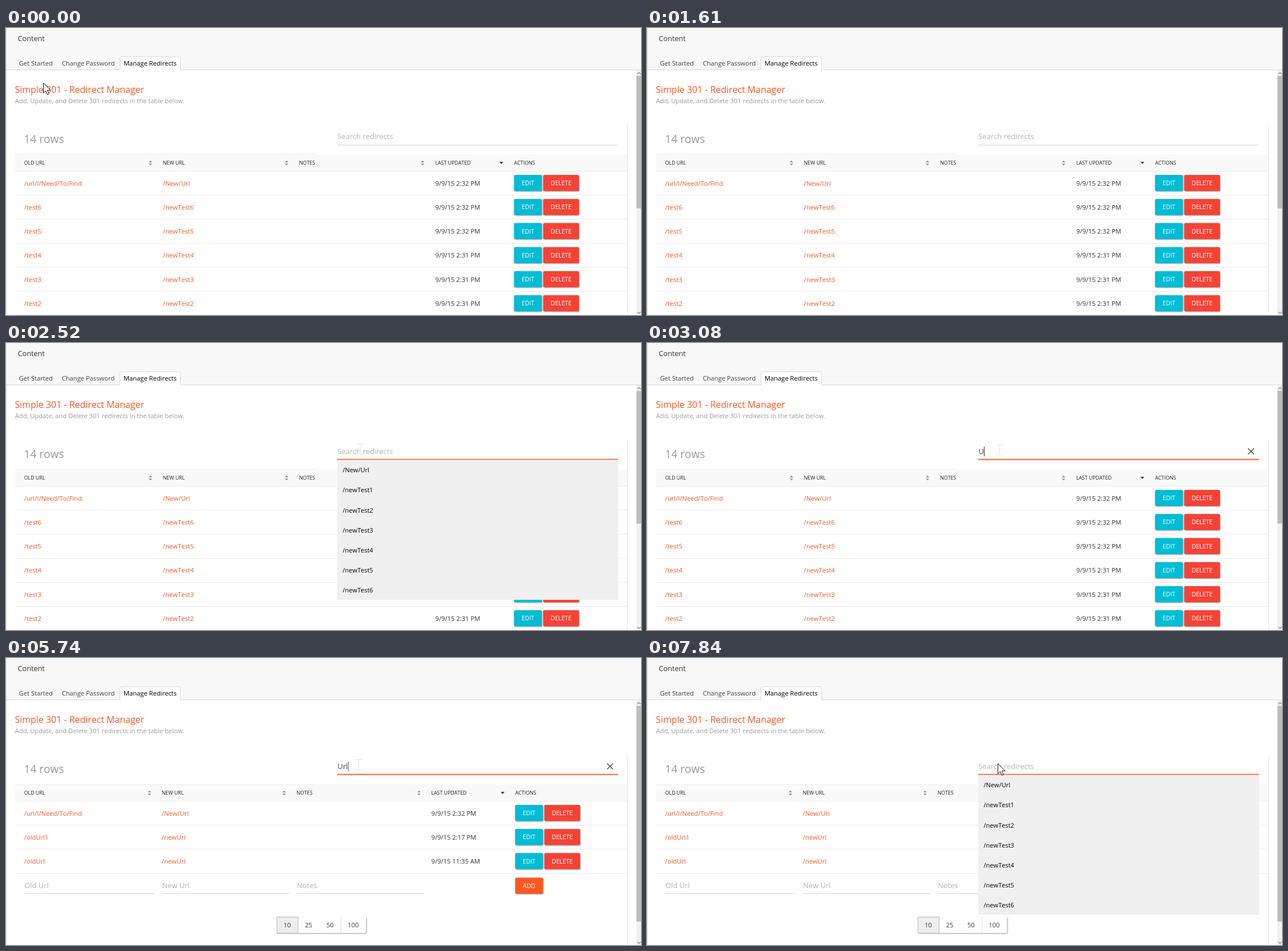
Write an HTML page with a canvas that moves like this. It is 1112 px wide and 504 px high and loops after 8 s.

```html
<!DOCTYPE html>
<html lang="en">
<head>
<meta charset="utf-8">
<title>Redirect manager</title>
<style>
  html, body { margin: 0; width: 100%; height: 100%; overflow: hidden; background: #fff; }
  canvas { display: block; }
</style>
</head>
<body>
<canvas id="stage" width="1112" height="504"></canvas>
<script>
const LOOP = 8000, STEP = 70;
const ORANGE = '#ff5722', TEAL = '#00bcd4', RED = '#f44336', GREY = '#9b9b9b';
const ctx = document.getElementById('stage').getContext('2d');
ctx.fontKerning = 'none';

// Moments of the story, in ms
const FOCUS = 1890, TYPE = 3010, FILTER = 4130, CLEARED = 7350;
const typing = [[0, ''], [FOCUS, ''], [TYPE, 'U'], [3220, 'Ur'], [3360, 'Url'],
                [6860, 'Ur'], [7140, 'U'], [CLEARED, '']];
const mousePath = [[0, 65, 96], [210, 72, 98], [280, 82, 105], [420, 84, 105], [1190, 559, 230],
                   [1260, 557, 230], [1610, 660, 189], [1890, 660, 189], [2380, 621, 186],
                   [2450, 621, 186], [2520, 620, 186], [2660, 620, 186], [2870, 617, 187]];

const allRows = [['/url/I/Need/To/Find', '/New/Url', '9/9/15 2:32 PM'],
  ...[6, 5, 4, 3, 2].map(n => ['/test' + n, '/newTest' + n, `9/9/15 2:3${n > 4 ? 2 : 1} PM`])];
const foundRows = [allRows[0],
  ['/oldUrl1', '/newUrl', '9/9/15 2:17 PM'], ['/oldUrl', '/newUrl', '9/9/15 11:35 AM']];
const allLayout = { columns: [32, 275, 513.5, 752, 890], sorters: [253, 491.3, 729.5, 867.5] };
const foundLayout = { columns: [32, 273, 509, 745, 892], sorters: [251, 487, 723.2, 869.7] };

function rect(x, y, w, h, color) {
  ctx.fillStyle = color;
  ctx.fillRect(x, y, w, h);
}

function text(str, x, y, size, color, align = 'left') {
  ctx.font = `${size}px "Open Sans", sans-serif`;
  ctx.textAlign = align;
  ctx.fillStyle = color;
  ctx.fillText(str, x, y);
}

function shape(points, fill, stroke, width = 1) {
  ctx.beginPath();
  points.forEach(([x, y]) => ctx.lineTo(x, y));
  ctx.closePath();
  if (fill) { ctx.fillStyle = fill; ctx.fill(); }
  if (stroke) { ctx.strokeStyle = stroke; ctx.lineWidth = width; ctx.stroke(); }
}

function lines(segments, color, width) {
  ctx.beginPath();
  for (const [x1, y1, x2, y2] of segments) { ctx.moveTo(x1, y1); ctx.lineTo(x2, y2); }
  ctx.strokeStyle = color;
  ctx.lineWidth = width;
  ctx.stroke();
}

function triangle(x, y, halfWidth, height, color) {
  shape([[x - halfWidth, y], [x + halfWidth, y], [x, y + height]], color);
}

function chevron(x, y, height) {
  lines([[x - 3, y, x, y + height], [x, y + height, x + 3, y]], '#888', 1.2);
}

function raised(x, y, w, h, color, radius = 2) {
  ctx.save();
  ctx.shadowColor = 'rgba(0,0,0,.42)';
  ctx.shadowBlur = 2;
  ctx.shadowOffsetX = ctx.shadowOffsetY = 1;
  ctx.fillStyle = color;
  ctx.beginPath();
  ctx.roundRect(x, y, w, h, radius);
  ctx.fill();
  ctx.restore();
}

function button(label, x, mid, w, color) {
  raised(x - .4, mid - 14.3, w + .6, 28.4, color);
  text(label, x + w / 2, mid + 3.9, 10.5, '#fff', 'center');
}

function drawChrome(filtered) {
  rect(0, 0, 1112, 504, '#fff');
  rect(0, 0, 1112, 73, '#f8f8f8');
  rect(0, 73, 1112, 1, '#d9d9d9');
  rect(0, 0, 1, 504, '#d9d9d9');
  ctx.beginPath();
  ctx.roundRect(199.5, 50.5, 106, 28, 3);
  ctx.fillStyle = '#fff';
  ctx.strokeStyle = '#d9d9d9';
  ctx.lineWidth = 1;
  ctx.fill();
  ctx.stroke();
  rect(199, 74, 108, 6, '#fff');
  text('Content', 20.5, 23, 12.7, '#333');
  text('Get Started', 22.7, 66, 11.17, '#444');
  text('Change Password', 97.7, 66, 11.17, '#444');
  text('Manage Redirects', 206, 66, 11.17, '#000');

  rect(1104, 74, 8, 430, '#f0f0f0');
  rect(1104, 84, 8, filtered ? 379 : 233, '#bdbdbd');
  chevron(1108.5, 81, -3);
  chevron(1108.5, 498.5, 3);

  text('Simple 301 - Redirect Manager', 15.5, 114, 15.93, ORANGE);
  text('Add, Update, and Delete 301 redirects in the table below.', 15.7, 132, 11.2, GREY);
  text('14 rows', 31.5, 202, 19.1, GREY);
  rect(1088, 170, 1, 334, '#e6e6e6');
}

function drawTable(rows, { columns, sorters }) {
  rect(16, 221, 525, 1, '#eee');
  rect(16, 222, 1072, 29, '#f9f9f9');
  rect(16, 251, 1072, 1, '#eaeaea');
  ['OLD URL', 'NEW URL', 'NOTES', 'LAST UPDATED', 'ACTIONS'].forEach((label, i) =>
    text(label, columns[i] - .3, 239.5, 8.82, '#222'));
  sorters.slice(0, 3).forEach(x => {
    triangle(x, 236, 3, -3.5, '#999');
    triangle(x, 238, 3, 3.5, '#999');
  });
  triangle(sorters[3], 235, 3.3, 3.7, '#333');

  rows.forEach(([from, to, date], i) => {
    const mid = 272.2 + i * 42.25, actions = columns[4];
    text(from, columns[0] - .2, mid + 4.3, 11.2, ORANGE);
    text(to, columns[1] - .2, mid + 4.3, 11.2, ORANGE);
    text(date, columns[3] - .2, mid + 4.3, 11.2, '#333');
    button('EDIT', actions, mid, 48, TEAL);
    button('DELETE', actions + 51, mid, 62, RED);
    rect(16, Math.round(mid + 20.8), 1072, 1, '#eaeaea');
  });
}

function drawAddRow({ columns }) {
  ['Old Url', 'New Url', 'Notes'].forEach((label, i) => {
    text(label, columns[i] + .3, 404, 12.9, '#b3b3b3');
    rect(columns[i], 413, i ? 223 : 228, 1, '#d5d5d5');
  });
  button('ADD', columns[4], 400, 48, ORANGE);

  raised(474, 455, 156.5, 28, '#fff', 1);
  rect(474, 454.5, 38, 29, '#bbb');
  rect(475, 455.7, 36, 27, '#eee');
  rect(586, 455, 1, 28, '#e0e0e0');
  [['10', 492.5], ['25', 530], ['50', 567.5], ['100', 608]].forEach(([label, x]) =>
    text(label, x, 473, 11, '#333', 'center'));
}

function caretAlpha(sinceKey) {
  const blink = sinceKey - 335;
  if (blink < 0) return 1;
  const fade = Math.min(1, (blink % 500) / 150);
  return Math.floor(blink / 500) % 2 ? fade : 1 - fade;
}

function drawSearch(t) {
  const [keyTime, value] = typing.findLast(([start]) => start <= t);
  rect(580, 205, 492, 1, '#d5d5d5');
  if (value) text(value, 580.5, 195, 13, '#444');
  else text('Search redirects', 580.5, 195, 12.9, '#b3b3b3');
  if (t < FOCUS) return;

  const reach = 246 * Math.min(1, (t - FOCUS + STEP) / 280);
  rect(826 - reach, 203.5, reach * 2, 2, '#ff6b3d');
  if (t >= TYPE + STEP && t < CLEARED)
    lines([[1052.5, 185, 1063, 195.5], [1063, 185, 1052.5, 195.5]], '#444', 1.2);

  if (!value) {
    rect(580, 205.5, 492, 245.5, '#f0f0f0');
    ['/New/Url', ...[1, 2, 3, 4, 5, 6].map(n => '/newTest' + n)].forEach((item, i) =>
      text(item, 589.5, 227.3 + i * 35.1, 11.05, '#000'));
  }
  ctx.font = '13px "Open Sans", sans-serif';
  const caretX = Math.round(580.7 + ctx.measureText(value).width);
  ctx.globalAlpha = caretAlpha(t - keyTime);
  rect(caretX, 182, 1, 17, '#222');
  ctx.globalAlpha = 1;
}

function mouseAt(t) {
  const next = mousePath.findIndex(([time]) => time > t);
  if (next < 0) return mousePath.at(-1).slice(1);
  const [t0, x0, y0] = mousePath[next - 1], [t1, x1, y1] = mousePath[next];
  const p = (t - t0) / (t1 - t0), eased = p * p * (3 - 2 * p);
  return [x0 + (x1 - x0) * eased, y0 + (y1 - y0) * eased];
}

function drawMouse(t) {
  const overText = (t >= 280 && t < 560) || (t >= 1540 && t < CLEARED);
  const [x, y] = t >= CLEARED ? [614, 185] : mouseAt(t).map(Math.round);
  ctx.save();
  ctx.translate(x + .5, y + .5);
  if (overText) {
    const beam = [[0, -8, 0, 8], [-6, -9, 6, -9], [-6, 9, 6, 9]];
    lines(beam, 'rgba(255,255,255,.8)', 3);
    lines(beam, '#e6e6e6', 1);
  } else {
    shape([[0, 0], [0, 17.6], [4.1, 13.9], [7.1, 20.6], [9.9, 19.4], [7, 12.9], [12.6, 12.7]],
      '#fff', '#111', 1);
  }
  ctx.restore();
}

function frame(now) {
  const t = Math.floor((now % LOOP) / STEP + .001) * STEP;
  const filtered = t >= FILTER;
  const layout = filtered ? foundLayout : allLayout;
  drawChrome(filtered);
  drawTable(filtered ? foundRows : allRows, layout);
  if (filtered) drawAddRow(layout);
  drawSearch(t);
  drawMouse(t);
  requestAnimationFrame(frame);
}
requestAnimationFrame(frame);
</script>
</body>
</html>
```
